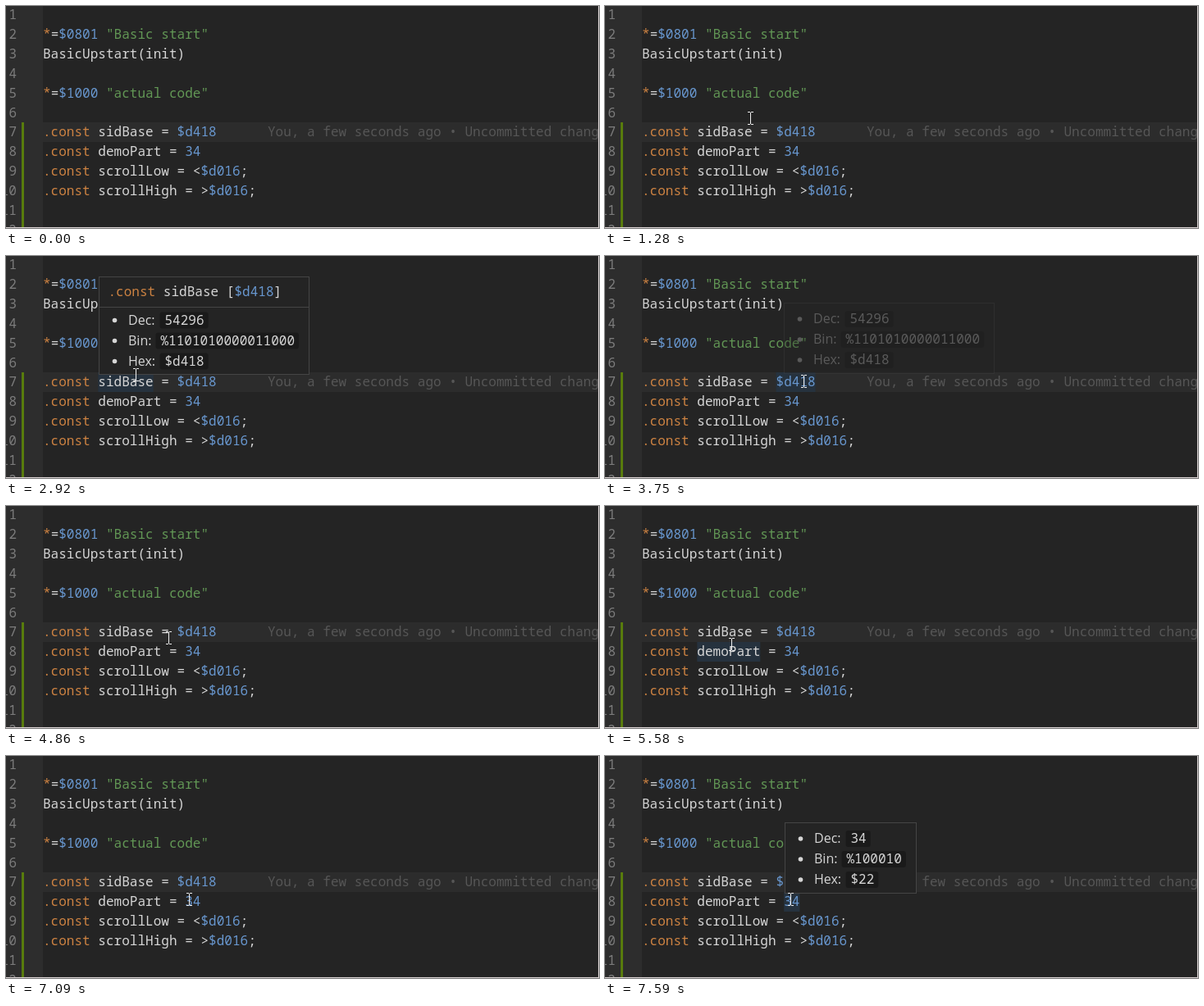
Write an HTML page that moves like this. It is 723 by 271 pixels and loops after 8000 ms.

```html
<!DOCTYPE html>
<html lang="en">
<head>
<meta charset="utf-8">
<title>Constant hover</title>
<style>
  html, body { margin: 0; width: 100%; height: 100%; overflow: hidden; background: #242424; }
  svg { display: block; }
  text { font: 16px "Noto Sans Mono", monospace; letter-spacing: .02px; white-space: pre; fill: #d6d6d6; }
  .key { fill: #cc8242; }
  .str { fill: #629755; }
  .num { fill: #6897cf; }
  .line { fill: #7c7c7c; text-anchor: end; }
  .blame { fill: #565656; }
  .label { font-family: "Open Sans", "Noto Sans", sans-serif; letter-spacing: 0; }
  .word { fill: #26323e; }
  .box { fill: #242424; stroke: #454545; }
  .chip { fill: #1a1a1a; }
</style>
</head>
<body>
<svg id="stage" width="723" height="271"></svg>
<script>
const LOOP = 8000, CHAR = 9.62, ROW = 23.85, LEFT = 45;

const code = [
  '', '*=$0801 "Basic start"', 'BasicUpstart(init)', '', '*=$1000 "actual code"', '',
  '.const sidBase = $d418', '.const demoPart = 34',
  '.const scrollLow = <$d016;', '.const scrollHigh = >$d016;', '', ''
];

// Word under the pointer (row, column, length) and its popup; times in ms
const hovers = [
  { row: 7, col: 7, len: 7, mark: 1890, fade: 1970, full: 2040, off: 3080,
    x: 113, y: 25, w: 256, head: '.const sidBase [$d418]', value: 0xd418 },
  { row: 7, col: 17, len: 5, mark: 3410, fade: 3750, full: 3810, off: 4760,
    x: 218, y: 57, w: 256, value: 0xd418 },
  { row: 8, col: 7, len: 8, mark: 5580, fade: 5680, full: 5680, off: 6750,
    x: 113, y: 48, w: 223, head: '.const demoPart [34]', value: 34 },
  { row: 8, col: 18, len: 2, mark: 7510, fade: 7590, full: 7590, off: LOOP,
    x: 219, y: 81, w: 160, value: 34 }
];

// Pointer moves: start, end, steps, from x, y, to x, y
const moves = [
  [610, 1280, 9, 523, 244, 177, 137],
  [1370, 1530, 3, 163, 139, 147, 145],
  [2920, 3330, 6, 158, 145, 242, 153],
  [4680, 5150, 7, 234, 155, 154, 169],
  [6670, 7170, 7, 178, 174, 226, 175]
];

const escape = s => s.replace(/</g, '&lt;').replace(/>/g, '&gt;');
const text = (x, y, body, cls = '') => `<text x="${x}" y="${y}" class="${cls}">${body}</text>`;
const rect = (x, y, w, h, more) => `<rect x="${x}" y="${y}" width="${w}" height="${h}" ${more}/>`;
const baseline = row => 40.2 + (row - 2) * ROW;

const paint = s => escape(s).replace(/(".*?")|(^\.const|^\*)|\$[\da-f]+|\b\d+/g, (m, str, key) =>
  `<tspan class="${str ? 'str' : key ? 'key' : 'num'}">${m}</tspan>`);

function word({ row, col, len }) {
  return rect(LEFT + col * CHAR, row === 7 ? 142 : 166, len * CHAR, 24, 'class="word"');
}

function popup({ x, y, w, head, value }) {
  const h = head ? 120 : 87, first = y + (head ? 52.5 : 19);
  const rows = [
    ['Dec:', 80.5, '' + value],
    ['Bin:', 75.5, '%' + value.toString(2)],
    ['Hex:', 80.5, '$' + value.toString(16)]
  ];
  let out = rect(x + .5, y + .5, w, h - 1, 'class="box"');
  if (head) {
    out += text(x + 11.5, y + 24, paint(head)) +
      rect(x + 1, y + 37, w - 1, 1, 'fill="#454545"');
  }
  rows.forEach(([label, dx, number], i) => {
    const mid = first + i * 25;
    out += `<circle cx="${x + 19.5}" cy="${mid + 1}" r="2.8" fill="#d6d6d6"/>` +
      text(x + 36, mid + 6, label, 'label') +
      rect(x + dx - 6, mid - 9, number.length * CHAR + 11, 20, 'rx="3" class="chip"') +
      text(x + dx, mid + 6, number);
  });
  return out;
}

const group = (name, draw) => hovers.map((h, i) => `<g id="${name}${i}">${draw(h)}</g>`).join('');
const stage = document.getElementById('stage');

stage.innerHTML =
  rect(0, 0, 723, 271, 'fill="#242424"') +
  rect(0, 0, 45, 271, 'fill="#2d2d2d"') +
  rect(45, 142, 678, 24, 'fill="#2c2c2c"') +
  rect(19, 142, 3, 129, 'fill="#587c0c"') +
  group('word', word) +
  code.map((s, i) => text(13, baseline(i + 1), i + 1, 'line') +
    text(LEFT, baseline(i + 1), paint(s))).join('') +
  text(319, baseline(7), 'You, a few seconds ago • Uncommitted changes', 'blame') +
  group('popup', popup) +
  `<path id="pointer" fill="#f0f0f0" shape-rendering="crispEdges"
    d="M-3-8h3v1h-3zM1-8h3v1h-3zM0-7h1v14h-1zM-3 7h3v1h-3zM1 7h3v1h-3z"/>` +
  rect(722, 0, 1, 271, 'fill="#d8d0d0"') +
  rect(0, 270, 723, 1, 'fill="#d8d0d0"');

const get = id => document.getElementById(id);
const words = hovers.map((_, i) => get('word' + i));
const popups = hovers.map((_, i) => get('popup' + i));
const pointer = get('pointer');

function pointerAt(t) {
  const move = moves.filter(m => t >= m[0]).pop();
  if (!move) return null;
  const [start, end, steps, x0, y0, x1, y1] = move;
  const u = Math.min(1, Math.floor((t - start) / (end - start) * (steps - 1)) / (steps - 1));
  const e = 1 - (1 - u) ** 1.5;
  return [x0 + (x1 - x0) * e, y0 + (y1 - y0) * e].map(Math.round);
}

function frame(now) {
  const t = now % LOOP;
  hovers.forEach((h, i) => {
    words[i].style.opacity = t >= h.mark && t < h.off ? 1 : 0;
    popups[i].style.opacity = t < h.fade || t >= h.off ? 0 : t < h.full ? .3 : 1;
  });
  const at = pointerAt(t);
  pointer.style.opacity = at ? 1 : 0;
  if (at) pointer.setAttribute('transform', `translate(${at})`);
}

const began = performance.now();
function tick() {
  frame(performance.now() - began);
  requestAnimationFrame(tick);
}
tick();
</script>
</body>
</html>
```
